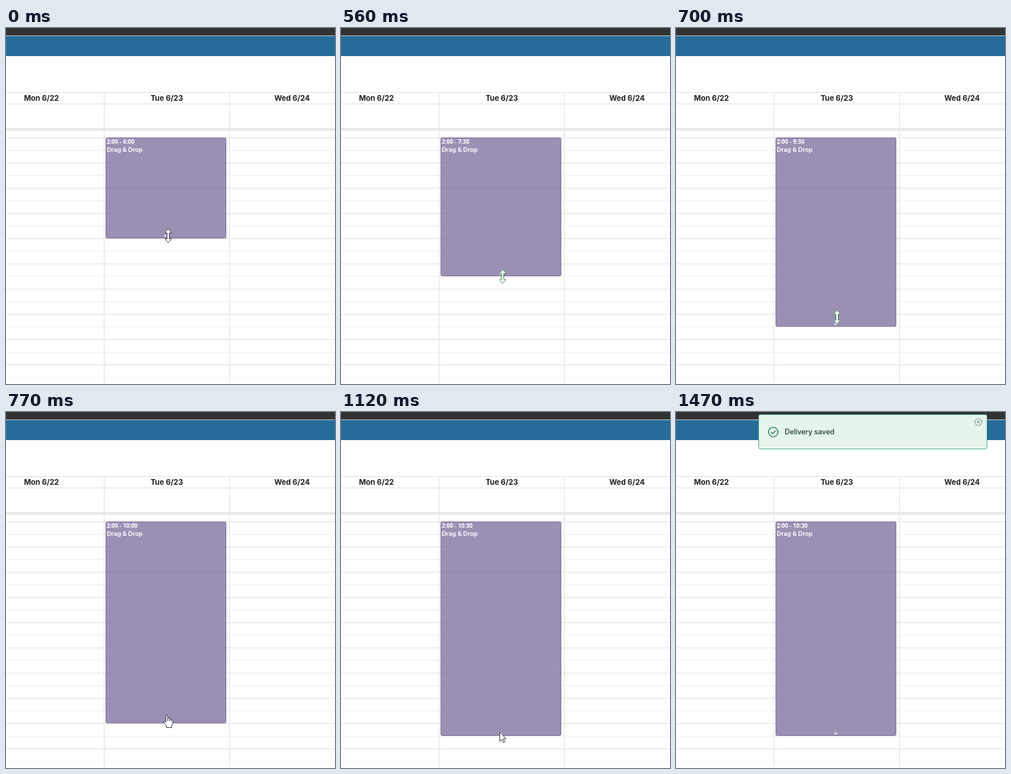
Recreate the animation shown at these times as an HTML page. Size 575 px wide and 621 px high, loop 2380 ms.

```html
<!DOCTYPE html>
<html lang="en">
<head>
<meta charset="utf-8">
<title>Calendar resize</title>
<style>
  html, body { margin: 0; width: 100%; height: 100%; overflow: hidden; background: #fff; }
  svg { display: block; }
  .line { stroke: #ddd; fill: none; }
  .half { stroke-dasharray: 1 1; }
  .day { font: 700 13px Inter, sans-serif; fill: #212121; text-anchor: middle; }
  .time { font: 700 10px "Open Sans", sans-serif; fill: #fff; }
  .name { font: 600 11px Inter, sans-serif; letter-spacing: -.1px; fill: #fff; }
  .grip { font: 700 10px "Open Sans", sans-serif; fill: #fff; text-anchor: middle; }
  .note { font: 500 12.5px Inter, sans-serif; letter-spacing: -.1px; fill: #203f33; }
  .cursor { fill: #fff; stroke: #25233a; stroke-linejoin: round; }
</style>
</head>
<body>
<svg width="575" height="621" viewBox="0 0 575 621">
  <rect width="575" height="621" fill="#fff"/>
  <rect width="575" height="13" fill="#333"/>
  <rect y="13" width="575" height="1" fill="#d5dde2"/>
  <rect y="14" width="575" height="35" fill="#266c9b"/>
  <g id="grid"></g>
  <rect y="175" width="575" height="4" fill="#ddd"/>
  <rect y="176" width="575" height="2" fill="#eee"/>
  <text class="day" x="62" y="127">Mon 6/22</text>
  <text class="day" x="281" y="127">Tue 6/23</text>
  <text class="day" x="500" y="127">Wed 6/24</text>

  <rect id="event" x="174.5" y="191.5" width="210" rx="2.5" fill="#7a6b9b" fill-opacity=".75" stroke="#7b6d99"/>
  <text id="time" class="time" x="176" y="202"></text>
  <text class="name" x="176" y="216">Drag &amp; Drop</text>
  <text id="grip" class="grip" x="279">=</text>

  <g id="toast">
    <rect x="144.5" y="4.5" width="399" height="60" rx="3" fill="#e6f4ec" stroke="#3ba871"/>
    <g fill="none" stroke="#21805a" stroke-width="1.6">
      <circle cx="170" cy="35" r="8.2"/>
      <path d="M166.2 35.2l2.7 2.6 4.9-5"/>
    </g>
    <text class="note" x="190" y="39">Delivery saved</text>
    <g fill="none" stroke="#8b9d80" stroke-width="1.2">
      <circle cx="528.5" cy="17.5" r="6"/>
      <path d="M526.2 15.2l4.6 4.6m0-4.6l-4.6 4.6"/>
    </g>
  </g>

  <g id="resize" class="cursor">
    <path d="M.5-12L5.5-6.5V-5H2.5V5H5.5V6.5L.5 12-4.5 6.5V5H-1.5V-5H-4.5V-6.5Z"/>
  </g>
  <g id="hand" class="cursor">
    <path d="M-1.5 12V1Q-1.5-.5 0-.5T1.5 1V6.5Q2-.2 4.5 6.5V7.5Q5.8 4.8 7.5 7.5V8.5Q9.3 6.5 10.5 9V14.5L8.5 18V21.5H-.5V19L-5.5 12Q-5.5 9.5-3.5 10.5Z"/>
    <path d="M1.5 6V10M4.5 7V10.5M7.5 8V11" fill="none"/>
  </g>
  <g id="arrow" class="cursor">
    <path d="M.5.5V16.5L4.2 13 6.8 18.8 9.2 17.7 6.7 12H11.5Z"/>
  </g>
</svg>
<script>
const LOOP = 2380, TOP = 191, SLOT = 22, LAST = 17;
const $ = id => document.getElementById(id);

// start time, pointer x, pointer y, pointer shape
const poses = [
  [0, 283, 362, 'resize'],
  [420, 283, 363, 'resize'],
  [490, 283, 388, 'resize'],
  [560, 282, 433, 'resize'],
  [630, 281, 474, 'resize'],
  [700, 281, 504, 'resize'],
  [770, 281, 529, 'hand'],
  [840, 279, 546, 'hand'],
  [910, 278, 551, 'hand'],
  [980, 278, 548, 'hand'],
  [1120, 277, 558, 'arrow'],
  [1260, 292, 563, 'arrow'],
  [1330, 343, 580, 'arrow'],
  [1400, 401, 597, 'arrow'],
  [1470, 0, 597, '']
];

function drawGrid() {
  const h = (y, type = '') => `<path class="line ${type}" d="M0 ${y + .5}H575"/>`;
  let out = h(112) + h(132);
  for (let i = 0, y = TOP; y < 621; i++, y += SLOT) out += h(y, i % 2 ? 'half' : '');
  for (const x of [171.5, 390.5]) out += `<path class="line" d="M${x} 112V621"/>`;
  $('grid').innerHTML = out;
}

const show = (id, on) => $(id).setAttribute('visibility', on ? 'visible' : 'hidden');

function render(ms) {
  const t = ms % LOOP;
  const [, x, y, shape] = poses.filter(p => p[0] <= t).pop();
  const slots = Math.min(LAST, Math.ceil((y - TOP) / SLOT));
  const bottom = TOP + slots * SLOT;
  $('event').setAttribute('height', bottom - TOP - 1);
  $('time').textContent = `2:00 - ${2 + (slots >> 1)}:${slots % 2 ? '30' : '00'}`;
  $('grip').setAttribute('y', bottom - 1);
  show('grip', shape !== 'hand');
  show('toast', t >= 1470);
  for (const id of ['resize', 'hand', 'arrow']) {
    show(id, id === shape);
    $(id).setAttribute('transform', `translate(${x} ${y + (id === 'resize' ? .5 : 0)})`);
  }
  // the pointer turns green while stretching the event
  $('resize').style.stroke = slots > 8 ? '#2f7c45' : '#25233a';
}

drawGrid();
render(0);
let start;
function tick(now) {
  start ??= now;
  render(Math.max(0, now - start));
  requestAnimationFrame(tick);
}
requestAnimationFrame(tick);
</script>
</body>
</html>
```
